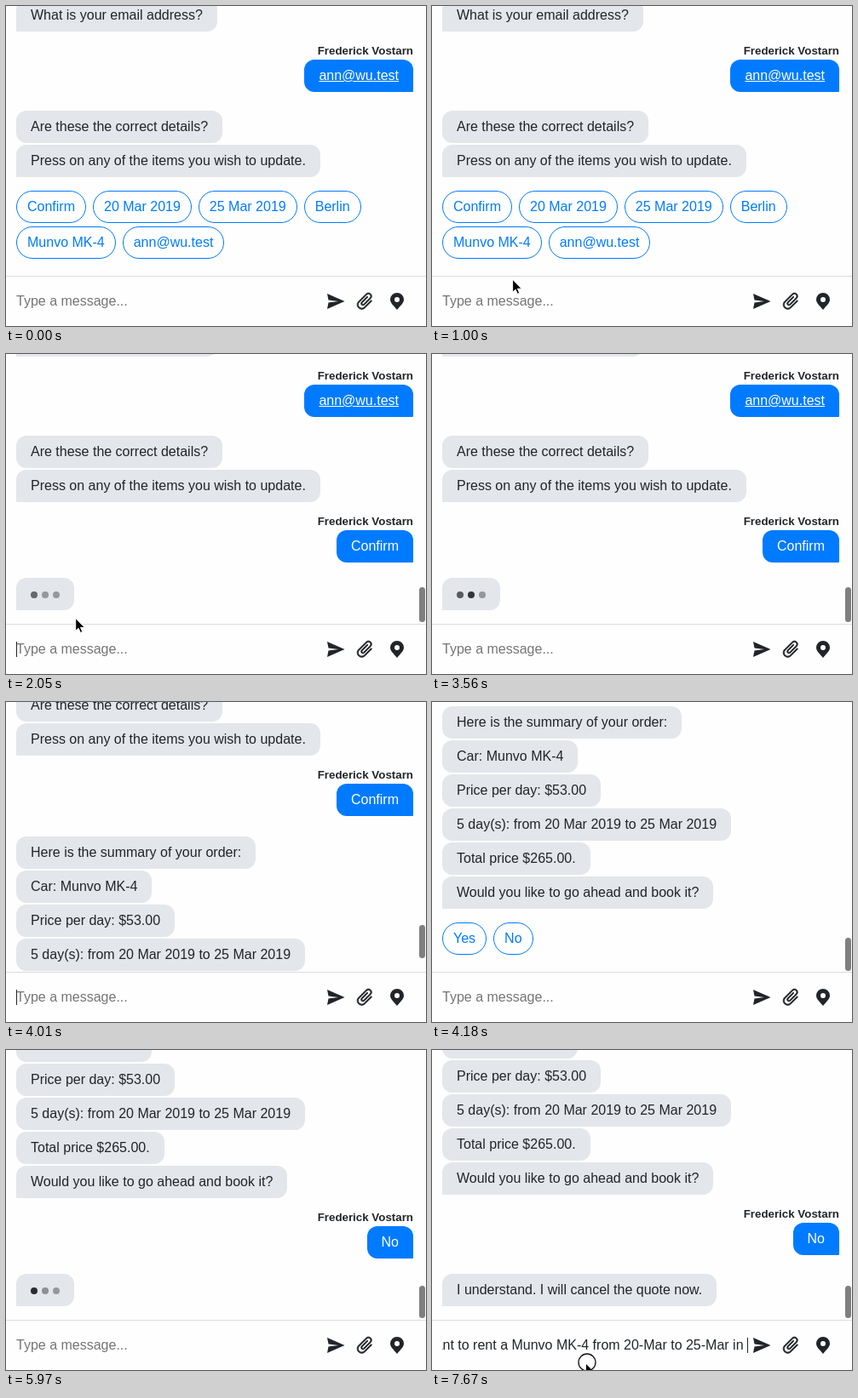
Recreate the animation shown at these times as an HTML page. Size 493 px wide and 376 px high, loop 8000 ms.

```html
<!DOCTYPE html>
<html lang="en">
<head>
<meta charset="utf-8">
<title>Car rental chat</title>
<style>
  html, body { margin: 0; width: 100%; height: 100%; overflow: hidden; background: #fefefe; }
  #stage { position: relative; width: 493px; height: 376px; overflow: hidden;
    font: 16px "Liberation Sans", Arial, sans-serif; color: #212529; }
  #view { position: absolute; left: 0; top: 0; width: 493px; height: 317px; overflow: hidden; }
  #list { position: absolute; left: 0; top: 0; width: 493px; }
  #list > div { position: absolute; white-space: nowrap; }
  .bot, .user { height: 38px; line-height: 38px; padding: 0 17px; border-radius: 12px; }
  .bot { left: 12px; background: #e3e6ea; }
  .bot.last { border-bottom-left-radius: 1px; }
  .user { right: 15px; background: #007bff; color: #fff; border-bottom-right-radius: 1px; }
  .user.link { text-decoration: underline; }
  .name { right: 15px; font-size: 13.333px; font-weight: bold; line-height: 20px; }
  .typing { width: 34px; }
  .typing i { position: absolute; top: 16px; width: 8px; height: 8px; border-radius: 50%; background: #212529; }
  .choices { left: 12px; width: 470px; display: flex; flex-wrap: wrap; gap: 4px 8px; }
  .choices span { position: relative; box-sizing: border-box; height: 38px; line-height: 36px; padding: 0 12px;
    border: 1px solid #007bff; border-radius: 19px; color: #007bff; }
  .choices .hover { background: #007bff; color: #fff; }
  .choices .focus::after { content: ""; position: absolute; inset: -4px; border: 3px solid #86b3f2;
    border-radius: 3px; box-shadow: 0 0 2px #a9c9f5; }
  #thumb { position: absolute; left: 485px; width: 7px; border-radius: 4px; background: #7f7f7f; }
  #bar { position: absolute; left: 0; top: 317px; width: 493px; height: 59px; box-sizing: border-box;
    border-top: 1px solid #d9dcdf; }
  #field { position: absolute; left: 12px; top: 19px; width: 359px; height: 20px; line-height: 20px;
    overflow: hidden; white-space: pre; }
  #hint { color: #757575; }
  #typed { position: absolute; right: 1px; top: 0; }
  #caret { position: absolute; top: 338px; width: 1px; height: 18px; background: #212529; }
  svg { position: absolute; left: 0; top: 0; }
</style>
</head>
<body>
<div id="stage">
  <div id="view"><div id="list"></div><div id="thumb"></div></div>
  <div id="bar">
    <div id="field"><span id="hint">Type a message...</span><span id="typed">I want to rent a Munvo MK-4 from 20-Mar to 25-Mar in </span></div>
  </div>
  <div id="caret"></div>
  <svg width="493" height="376" viewBox="0 0 493 376">
    <g fill="#212529">
      <path d="M377 338L397.5 347L377 356L378.5 348.6L390 347L378.5 345.4Z"/>
      <path transform="translate(421.5 347) rotate(45) translate(-12.5 -12)" stroke="#212529" stroke-width=".6"
        d="M16.5 6v11.5c0 2.21-1.79 4-4 4s-4-1.79-4-4V5c0-1.38 1.12-2.5 2.5-2.5s2.5 1.12 2.5 2.5v10.5c0 .55-.45 1-1 1s-1-.45-1-1V6H10v9.5c0 1.38 1.12 2.5 2.5 2.5s2.5-1.12 2.5-2.5V5c0-2.21-1.79-4-4-4S7 2.79 7 5v12.5c0 3.04 2.46 5.5 5.5 5.5s5.5-2.46 5.5-5.5V6z"/>
      <path fill-rule="evenodd" d="M459 357C455 352 451 349 451 345A8 8 0 0 1 467 345C467 349 463 352 459 357ZM456 345a3 3 0 0 0 6 0a3 3 0 0 0-6 0Z"/>
    </g>
    <g id="pointer">
      <path id="arrow" d="M-1.5 1v15l3.4-3.2 2.3 5.2 2.4-1-2.3-5.1h4.8z" fill="#000" stroke="#fff"/>
      <path id="hand" fill="#fff" stroke="#111"
        d="M-1.6 6.5V-2.2a1.7 1.7 0 0 1 3.4 0V3.6q2.6-.9 3 .8q2.4-.6 2.7.9q2.2-.3 2.2 1.9v3q0 2.5-1.6 4.3v2h-8v-1.8q-1.2-1-2.4-3.4q-1-2-2.7-3.6q-.8-1.6 .8-2q1.3 0 2.6 1.3z"/>
      <circle id="ring" r="10" fill="none" stroke-width="1.3"/>
    </g>
  </svg>
</div>
<script>
const LOOP = 8000;
const SENT1 = 1710, REPLY1 = 3870, SENT2 = 5450, REPLY2 = 6790, PASTE = 7670;
const $ = id => document.getElementById(id);
const list = $('list');
const items = [];

function add(cls, y, html, from = 0, to = LOOP) {
  const el = document.createElement('div');
  el.className = cls;
  el.style.top = y + 'px';
  el.innerHTML = html;
  list.append(el);
  items.push({ el, from, to });
  return el;
}
function say(y, text, from, cls = '') {
  add('name', y - 20, 'Frederick Vostarn', from);
  add('user ' + cls, y, text, from);
}
const choices = (y, labels, from, to) =>
  add('choices', y, labels.map(s => `<span>${s}</span>`).join(''), from, to);
const typing = (y, from, to) =>
  add('bot last typing', y, [17, 30, 43].map(x => `<i style="left:${x}px"></i>`).join(''), from, to);

add('bot last', -8, 'What is your email address?');
say(63, 'ann@wu.test', 0, 'link');
add('bot', 123, 'Are these the correct details?');
add('bot last', 163, 'Press on any of the items you wish to update.');
const details = choices(217, ['Confirm', '20 Mar 2019', '25 Mar 2019', 'Berlin', 'Munvo MK-4', 'ann@wu.test'], 0, SENT1);
say(234, 'Confirm', SENT1);
const wait1 = typing(290, SENT1, REPLY1);
['Here is the summary of your order:', 'Car: Munvo MK-4', 'Price per day: $53.00',
  '5 day(s): from 20 Mar 2019 to 25 Mar 2019', 'Total price $265.00.',
  'Would you like to go ahead and book it?'
].forEach((s, i) => add(i < 5 ? 'bot' : 'bot last', 296 + 40 * i, s, REPLY1));
const answer = choices(550, ['Yes', 'No'], REPLY1, SENT2);
say(567, 'No', SENT2);
const wait2 = typing(623, SENT2, REPLY2);
add('bot last', 627, 'I understand. I will cancel the quote now.', REPLY2);

const clamp = x => Math.max(0, Math.min(1, x));
const mix = (a, b, p) => a + (b - a) * p;
const swing = (t, from, len) => (1 - Math.cos(Math.PI * clamp((t - from) / len))) / 2;
const within = (t, a, b) => t >= a && t < b;
const show = (el, on) => { el.style.display = on ? '' : 'none'; };
// the screen refreshes about 18 times a second
function tick(t) {
  if (within(t, 5968, 6140)) return 5968;
  return t - ((t - 4008) % 56 + 56) % 56;
}

function drawDots(el, t, start) {
  [...el.children].forEach((dot, i) => {
    const age = (t - start) / 1000 - i / 3;
    let p = 0;
    if (age > 0) {
      const phase = age % 1 * 2;
      const eased = 1 - (1 - phase % 1) ** 2.3;
      p = phase < 1 ? eased : 1 - eased;
    }
    dot.style.opacity = 0.4 + 0.6 * p;
  });
}

function drawThumb(t, q) {
  let top, h;
  if (t < REPLY1) { top = mix(271, 274, swing(q, SENT1, 290)); h = 41; }
  else if (t < SENT2) { top = mix(251, 277, swing(q, 3878, 290)); h = 39; }
  else { top = mix(270, 277, swing(q, 5480, 290)); h = 38; }
  const s = $('thumb').style;
  s.top = top + 'px';
  s.height = h + 'px';
  s.opacity = t < SENT1 ? 0 : t < SENT2 ? 1 - clamp((q - 4580) / 230) : 1;
}

const paths = [
  [[770, 115, 370], [1290, 63, 233], [1770, 63, 233], [2340, 105, 392]],
  [[5030, 125, 330], [5250, 101, 275], [5520, 101, 275], [5960, 120, 392]],
  [[7320, 186, 378], [7430, 182, 367], [LOOP, 182, 367]]
];
function drawPointer(t, q) {
  const path = paths.find(p => within(t, p[0][0], p[p.length - 1][0]));
  show($('pointer'), path);
  if (!path) return;
  const i = path.findIndex(p => p[0] > t);
  const [a, b] = [path[i - 1], path[i]];
  const p = swing(Math.max(q, a[0]), a[0], b[0] - a[0]);
  $('pointer').setAttribute('transform', `translate(${mix(a[1], b[1], p)} ${mix(a[2], b[2], p)})`);
  const hand = within(t, 1200, SENT1) || within(t, 5190, SENT2);
  show($('hand'), hand);
  show($('arrow'), !hand);
  show($('ring'), within(t, 1590, SENT1) || within(t, 5340, SENT2) || t >= 7430);
  $('ring').setAttribute('stroke', hand ? '#fff' : '#111');
}

function caretOn(t) {
  if (t < 1590) return within(t, 290, 790) || t >= 1290;
  if (within(t, SENT1, 5340)) return (t - 1640) % 1000 < 500;
  if (within(t, SENT2, PASTE)) return (t - 5360) % 1000 < 500;
  return t >= PASTE;
}

function draw(t) {
  const q = tick(t);
  for (const { el, from, to } of items) show(el, within(t, from, to));
  const scroll = 27 * swing(q, SENT1, 290) + 264 * swing(q, 3878, 290)
    + 69 * swing(q, 5480, 290) + 4 * swing(q, REPLY2, 100);
  list.style.top = -Math.round(scroll) + 'px';
  details.children[0].className = (t >= 1200 ? 'hover ' : '') + (t >= 1590 ? 'focus' : '');
  answer.children[0].className = t >= 5340 ? 'focus' : '';
  answer.children[1].className = t >= 5190 ? 'hover' : '';
  drawDots(wait1, q, 1940);
  drawDots(wait2, q, 5620);
  drawThumb(t, q);
  drawPointer(t, q);
  show($('hint'), t < PASTE);
  show($('typed'), t >= PASTE);
  show($('caret'), caretOn(t));
  $('caret').style.left = (t < PASTE ? 12 : 370) + 'px';
}

const begin = performance.now();
function frame() {
  draw((performance.now() - begin) % LOOP);
  requestAnimationFrame(frame);
}
frame();
</script>
</body>
</html>
```
